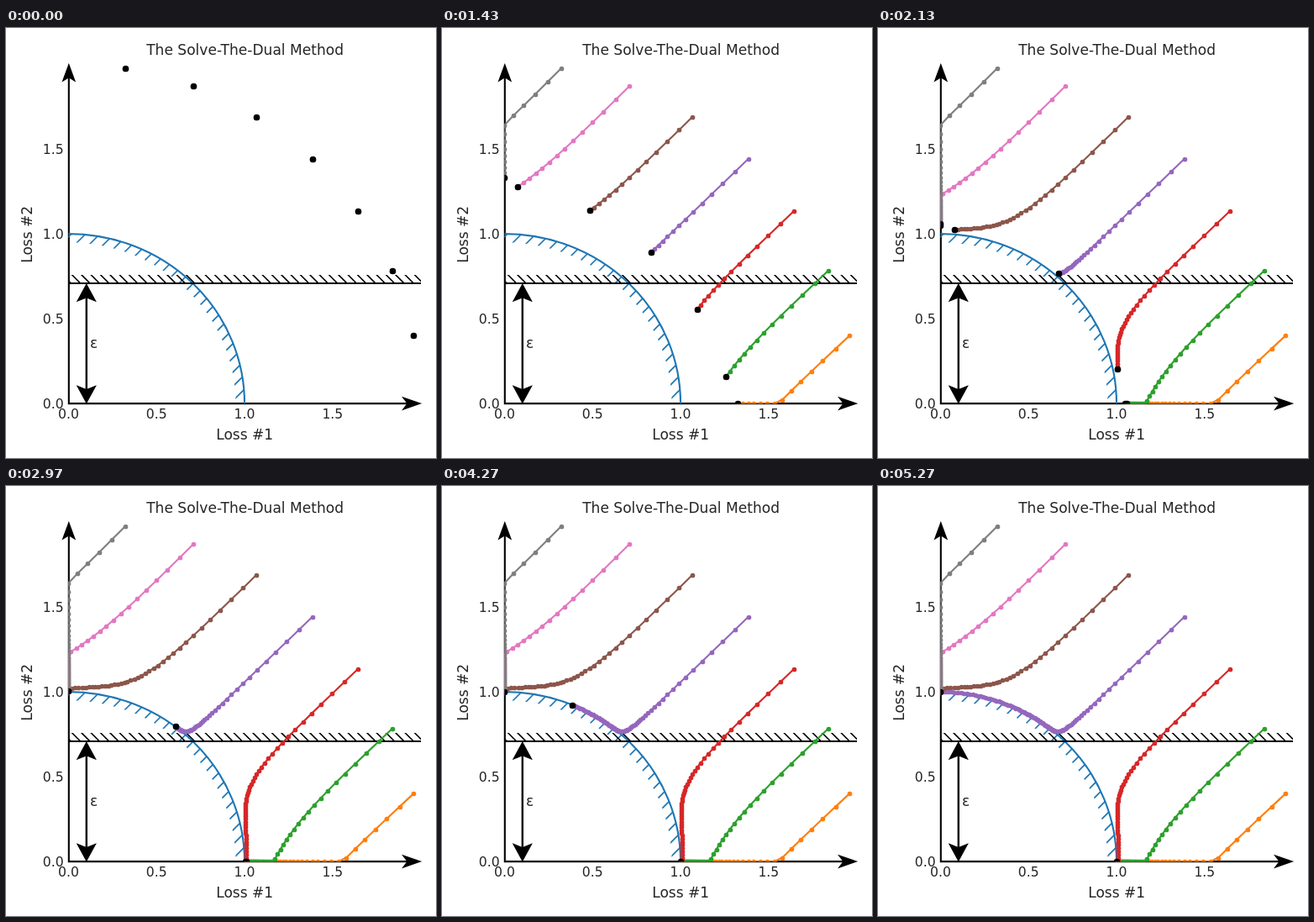
An HTML page for the animation above (7660 ms loop, 512 px wide and 512 px high).

```html
<!DOCTYPE html>
<html lang="en">
<head>
<meta charset="utf-8">
<title>The Solve-The-Dual Method</title>
<style>
  html, body { margin: 0; width: 100%; height: 100%; overflow: hidden; background: #fff; }
  svg { display: block; width: 100vw; height: 100vh; }
  text { font: 17.07px "DejaVu Sans", sans-serif; fill: #262626; text-anchor: middle; }
  .tick { font-size: 15.64px; }
  .right { text-anchor: end; }
  .left { text-anchor: start; }
</style>
</head>
<body>
<svg id="stage" viewBox="0 0 512 512" xmlns="http://www.w3.org/2000/svg">
  <defs>
    <clipPath id="axes"><rect x="74.4" y="43" width="419.6" height="404.3"/></clipPath>
    <clipPath id="limitBand"><rect x="74.4" y="294" width="419.6" height="10"/></clipPath>
    <clipPath id="frontBand"><path id="ring"/></clipPath>
  </defs>
  <rect width="512" height="512" fill="#fff"/>
  <g id="arrows" stroke="#000"></g>
  <g fill="none" stroke-width="1.6">
    <path id="frontHatch" stroke="#1f77b4" clip-path="url(#frontBand)"/>
    <path id="limitHatch" stroke="#000" clip-path="url(#limitBand)"/>
  </g>
  <g clip-path="url(#axes)" fill="none" stroke-width="2.13">
    <path id="front" stroke="#1f77b4"/>
    <path d="M74 304H494" stroke="#000" stroke-width="2"/>
    <g id="trails" stroke-linejoin="round" stroke-linecap="round"></g>
    <path id="heads" stroke="#000" stroke-width="7.7" stroke-linecap="round"/>
  </g>
  <g id="labels"></g>
</svg>
<script>
const LOOP = 7660, START = 1000, STEP = 1000 / 30, STEPS = 128;
const RATE = 0.02;
const COLORS = ['#ff7f0e', '#2ca02c', '#d62728', '#9467bd', '#8c564b', '#e377c2', '#7f7f7f'];
const UNIT_X = 209.6, UNIT_Y = 202.1, AXIS_X = 74.8, AXIS_Y = 447.1;

const px = x => 74.45 + UNIT_X * x;
const py = y => 447.2 - UNIT_Y * y;
const snap = v => Math.round(v) + 0.5;
const at = id => document.getElementById(id);

function add(parent, tag, attrs, content) {
  const node = document.createElementNS('http://www.w3.org/2000/svg', tag);
  for (const key in attrs) node.setAttribute(key, attrs[key]);
  if (content) node.textContent = content;
  at(parent).appendChild(node);
  return node;
}

const label = (x, y, content, cls = '', transform = '') =>
  add('labels', 'text', { x, y, class: cls, transform }, content);

function arrowHead(x, y, angle, length, half, notch) {
  add('arrows', 'path', {
    d: `M0 0L${-length} ${-half}L${-notch} 0L${-length} ${half}Z`,
    transform: `translate(${x} ${y}) rotate(${angle})`,
    'stroke-width': 1.9
  });
}

function hatch(spacing, slope) {
  let d = '';
  for (let c = -46 * spacing; c < 1040; c += spacing) d += `M${c} 0l${slope * 512} 512`;
  return d;
}

function drawChart() {
  const arc = (r, sweep) => `A${r * UNIT_X} ${r * UNIT_Y} 0 0 ${sweep} `;
  const outer = `M${px(0)} ${py(1)}${arc(1, 1)}${px(1)} ${py(0)}`;
  at('front').setAttribute('d', outer);
  at('ring').setAttribute('d', `${outer}H${px(0.95)}${arc(0.95, 0)}${px(0)} ${py(0.95)}Z`);
  at('frontHatch').setAttribute('d', hatch(17, -1));
  at('limitHatch').setAttribute('d', hatch(34 / 3, 1));

  const shaftX = AXIS_X + 21;
  add('arrows', 'path', { d: `M${AXIS_X} 57V${AXIS_Y}H480`, fill: 'none', 'stroke-width': 2.1 });
  add('arrows', 'path', { d: `M${shaftX} 317V435`, 'stroke-width': 2.4 });
  arrowHead(AXIS_X, 44.6, -90, 17.7, 6.5, 13.7);
  arrowHead(492.4, AXIS_Y, 0, 18.7, 6.5, 13.7);
  arrowHead(shaftX, 306, -90, 18.4, 10, 14.4);
  arrowHead(shaftX, 445.5, 90, 18.4, 10, 14.4);

  label(284.6, 32, 'The Solve-The-Dual Method');
  label(284.2, 490, 'Loss #1');
  label(0, 0, 'Loss #2', '', 'translate(30.5 245.8) rotate(-90)');
  label(100, 381, 'ε', 'left');
  for (const v of [0, 0.5, 1, 1.5]) {
    label(px(v), 465.3, v.toFixed(1), 'tick');
    label(68.7, py(v) + 5.8, v.toFixed(1), 'tick right');
  }
}

// Gradient descent on loss 1 + loss 2, with radius 1 + rho² and angle theta.
function descend(theta) {
  const points = [];
  let rho = 1;
  for (let n = 0; n <= STEPS; n++) {
    const r = 1 + rho * rho, c = Math.cos(theta), s = Math.sin(theta);
    points.push([px(r * c), py(r * s)]);
    rho -= RATE * 2 * rho * (c + s);
    theta = Math.min(Math.PI / 2, Math.max(0, theta - RATE * r * (c - s)));
  }
  return points;
}

// Markers sit on whole pixels, lines do not.
const dot = ([x, y]) => `M${snap(x)} ${snap(y)}h0`;

drawChart();
const runs = COLORS.map((stroke, i) => ({
  points: descend((i + 1) * Math.PI / 15.6),
  line: add('trails', 'path', { stroke }),
  dots: add('trails', 'path', { stroke, 'stroke-width': 5.7 })
}));

let shown = -1;
function draw(time) {
  const n = Math.min(STEPS, Math.max(0, Math.floor((time - START + 5) / STEP)));
  if (n === shown) return;
  shown = n;
  for (const { points, line, dots } of runs) {
    const past = points.slice(0, n + 1);
    line.setAttribute('d', 'M' + past.map(p => p.join(' ')).join('L'));
    dots.setAttribute('d', past.map(dot).join(''));
  }
  at('heads').setAttribute('d', runs.map(run => dot(run.points[n])).join(''));
}

const origin = performance.now();
function tick() {
  draw((performance.now() - origin) % LOOP);
  requestAnimationFrame(tick);
}
tick();
</script>
</body>
</html>
```
